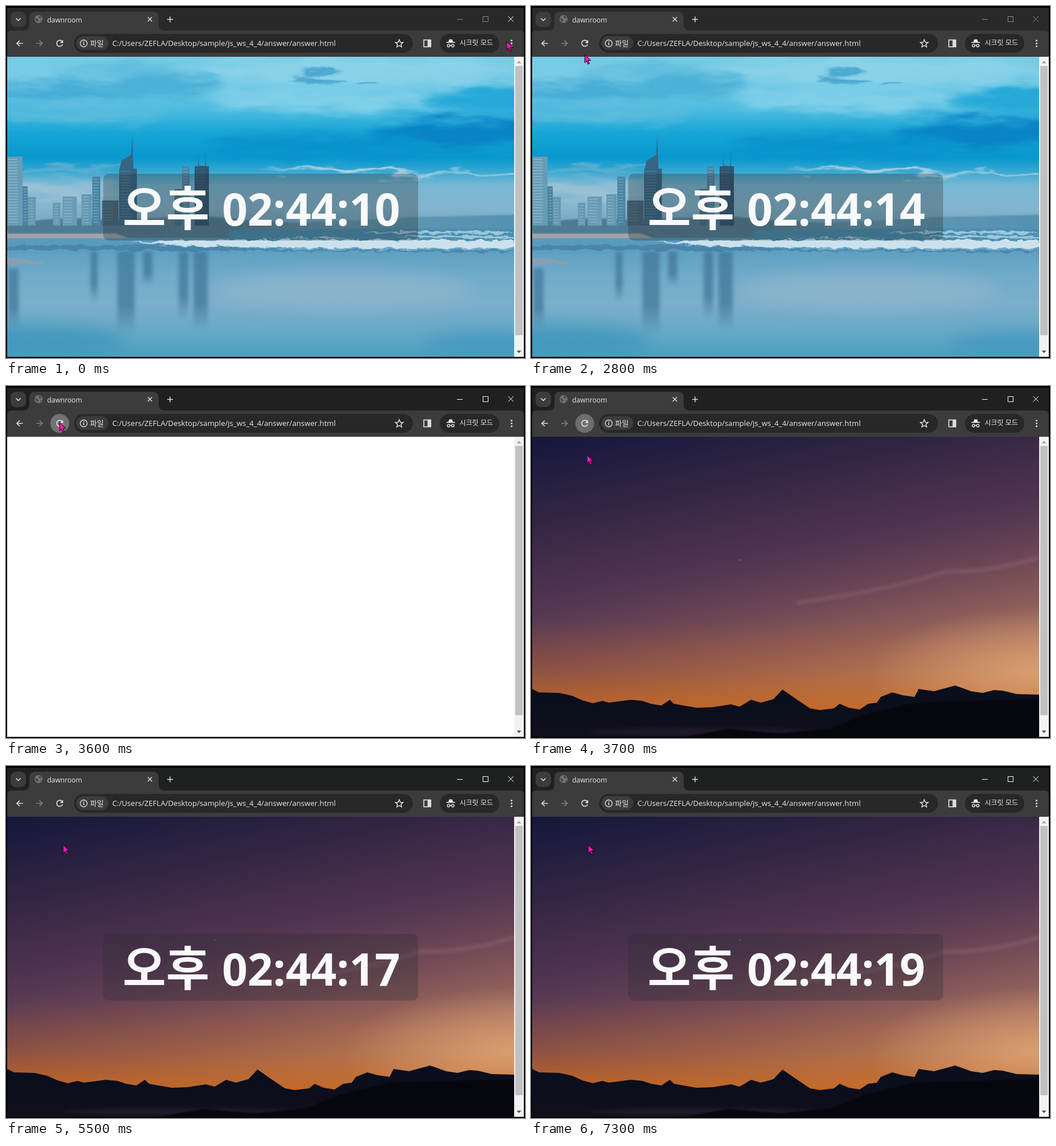
Recreate the animation shown at these times as an HTML page. Size 908x617 px, loop 8 s.

```html
<!DOCTYPE html>
<html lang="ko">
<head>
<meta charset="utf-8">
<title>dawnroom</title>
<style>
  html, body { margin: 0; width: 100%; height: 100%; overflow: hidden; background: #000; }
  svg { display: block; width: 908px; height: 617px; }
  text { fill: #e8e8e8; font-family: "Open Sans", "Noto Sans", sans-serif; white-space: pre; }
  .ko { font-family: "Noto Sans CJK KR", "Noto Sans CJK", sans-serif; }
  .line { fill: none; stroke: #dcdcdc; stroke-width: 1.7; }
  .soft { filter: blur(14px); }
  .haze { filter: blur(3px); }
  .fine { filter: blur(1px); }
  .cloud { filter: blur(9px) url(#billow); }
  .wisp { filter: blur(2px) url(#billow); }
  .foam { filter: url(#ripple) blur(.6px); }
  #clock text { font-weight: 700; fill: #f8f9fa; }
</style>
</head>
<body>
<svg viewBox="0 0 908 617">
  <defs>
    <clipPath id="page"><rect x="2" y="89" width="887" height="526"/></clipPath>
    <filter id="billow" color-interpolation-filters="sRGB">
      <feTurbulence type="fractalNoise" baseFrequency=".012 .05" numOctaves="4" seed="4" result="noise"/>
      <feDisplacementMap in="SourceGraphic" in2="noise" scale="42" xChannelSelector="R" yChannelSelector="G"/>
    </filter>
    <filter id="ripple" color-interpolation-filters="sRGB">
      <feTurbulence type="fractalNoise" baseFrequency=".05 .12" numOctaves="3" seed="8" result="noise"/>
      <feDisplacementMap in="SourceGraphic" in2="noise" scale="11" xChannelSelector="R" yChannelSelector="G"/>
    </filter>
    <linearGradient id="sky" x2="0" y2="1">
      <stop offset="0" stop-color="#78cbe4"/><stop offset=".14" stop-color="#7bcde7"/>
      <stop offset=".31" stop-color="#4bbbe0"/><stop offset=".43" stop-color="#18a6d6"/>
      <stop offset=".58" stop-color="#0798ce"/><stop offset=".66" stop-color="#38a8d2"/>
      <stop offset=".74" stop-color="#78b8d4"/><stop offset=".87" stop-color="#83b5ce"/>
      <stop offset="1" stop-color="#6aa4c0"/>
    </linearGradient>
    <linearGradient id="wet" x2="0" y2="1">
      <stop offset="0" stop-color="#5d9fc1"/><stop offset=".25" stop-color="#70abca"/>
      <stop offset=".5" stop-color="#7bafcb"/><stop offset=".76" stop-color="#68a9c7"/>
      <stop offset="1" stop-color="#4c9fc2"/>
    </linearGradient>
    <linearGradient id="hills">
      <stop offset="0" stop-color="#4e7b92"/><stop offset=".45" stop-color="#527f96"/>
      <stop offset=".65" stop-color="#6398b3"/><stop offset="1" stop-color="#5592b2"/>
    </linearGradient>
    <linearGradient id="fade" x2="0" y2="1">
      <stop offset="0" stop-color="#34698b" stop-opacity=".55"/>
      <stop offset=".65" stop-color="#34698b" stop-opacity=".6"/>
      <stop offset="1" stop-color="#34698b" stop-opacity="0"/>
    </linearGradient>
    <linearGradient id="dusk" gradientUnits="userSpaceOnUse" x1="0" y1="89" x2="117" y2="673">
      <stop offset="0" stop-color="#14173a"/><stop offset=".29" stop-color="#382846"/>
      <stop offset=".5" stop-color="#533652"/><stop offset=".64" stop-color="#6e4755"/>
      <stop offset=".78" stop-color="#8f5f5a"/><stop offset="1" stop-color="#cb9873"/>
    </linearGradient>
    <linearGradient id="glow" x2="0" y2="1">
      <stop offset="0" stop-color="#b85a1e" stop-opacity="0"/>
      <stop offset=".55" stop-color="#b85a1e" stop-opacity=".32"/>
      <stop offset="1" stop-color="#c4631c" stop-opacity=".88"/>
    </linearGradient>
    <radialGradient id="halo">
      <stop offset="0" stop-color="#e3aa7c" stop-opacity=".7"/>
      <stop offset="1" stop-color="#e3aa7c" stop-opacity="0"/>
    </radialGradient>
    <linearGradient id="ridge" x2="0" y2="1">
      <stop offset="0" stop-color="#0a0e1c"/><stop offset=".6" stop-color="#0c0e1b"/>
      <stop offset="1" stop-color="#11101f"/>
    </linearGradient>
  </defs>

  <rect width="908" height="617"/>
  <rect id="bar" x="2" y="3" width="904" height="60"/>
  <path d="M2 89V51q0-8 8-8h20q11 0 11-11V20q0-10 10-10h206q10 0 10 10v12q0 11 11 11h620q8 0 8 8v38z" fill="#3c3c3c"/>
  <rect x="8" y="10" width="27" height="27" rx="9" fill="#3c3c3c"/>
  <path class="line" d="M17.5 21.5l4 4 4-4"/>
  <circle cx="57" cy="23" r="7" fill="#72767a"/>
  <path d="M51 21l4 1 2 3-2 3-3-3zM57 17l5 2-1 3-4-1zM60 24l3 1-2 3z" fill="#474a4d"/>
  <text x="72" y="29" font-size="12">dawnroom</text>
  <path class="line" d="M248 19.5l7.500 7.500m0-7.500l-7.500 7.500M282 23.500h10m-5-5v10" style="stroke-width:1.500"/>
  <g id="controls" fill="none">
    <path d="M789 23.500h10"/><rect x="834.500" y="18.500" width="9" height="9"/>
    <path id="close" d="M878.500 18l9.500 9.500m0-9.500l-9.500 9.500"/>
  </g>

  <circle id="hover" cx="94" cy="65.500" r="16.500"/>
  <path class="line" d="M29.500 65.500H19m5-5l-5 5 5 5"/>
  <path class="line" d="M53 65.500h10.500m-5-5l5 5-5 5" style="stroke:#808080"/>
  <path class="line" d="M98.500 62.500A5.300 5.300 0 1 0 99 67.200"/>
  <path d="M100 59.500v5.500h-5.500z" fill="#dcdcdc"/>
  <rect x="119" y="49" width="593" height="33" rx="16.500" fill="#282828"/>
  <rect x="123" y="53" width="56" height="24" rx="12" fill="#3c3c3c"/>
  <circle class="line" cx="136" cy="65.500" r="6" style="stroke-width:1.400"/>
  <path class="line" d="M136 64.500v4m0-6.500v1.500"/>
  <text class="ko" x="147" y="69.500" font-size="13">파일</text>
  <text x="186" y="70" font-size="13.100">C:/Users/ZEFLA/Desktop/sample/js_ws_4_4/answer/answer.html</text>
  <path class="line" d="M688 59l1.900 4.500 4.800.4-3.700 3.200 1.200 4.700-4.200-2.500-4.200 2.500 1.200-4.700-3.700-3.200 4.800-.4z" style="stroke-width:1.500"/>
  <rect class="line" x="731" y="59.500" width="12" height="12"/>
  <rect x="737.500" y="59.500" width="6" height="12" fill="#dcdcdc"/>
  <rect x="759" y="49" width="104" height="33" rx="16.500" fill="#282828"/>
  <path d="M774 63l1.500-4.500h5L782 63h3.500v1.500h-15V63z" fill="#f0f0f0"/>
  <path class="line" d="M776.500 69.500a2.200 2.200 0 1 1-4.400 0 2.200 2.200 0 1 1 4.400 0q1.500-1 3 0a2.200 2.200 0 1 1 4.400 0 2.200 2.200 0 1 1-4.400 0" style="stroke-width:1.500"/>
  <text class="ko" x="793.500" y="69" font-size="12">시크릿 모드</text>
  <g fill="#dcdcdc"><circle cx="884.500" cy="60.500" r="1.600"/><circle cx="884.500" cy="65.500" r="1.600"/><circle cx="884.500" cy="70.500" r="1.600"/></g>

  <rect x="2" y="89" width="887" height="526" fill="#fff"/>
  <rect x="889" y="89" width="17" height="526" fill="#f1f3f3"/>
  <rect x="891" y="105" width="13" height="472" fill="#c1c1c1"/>
  <path d="M893.500 100.500h8l-4-4.500z" fill="#a3a3a3"/><path d="M893.500 604h8l-4 4.500z" fill="#505050"/>

  <g id="day" clip-path="url(#page)">
    <rect x="2" y="89" width="887" height="305" fill="url(#sky)"/>
    <g class="cloud">
      <ellipse cx="610" cy="110" rx="270" ry="20" fill="#8ad2e8"/>
      <ellipse cx="560" cy="165" rx="200" ry="20" fill="#80cfe8"/>
      <ellipse cx="90" cy="150" rx="150" ry="16" fill="#45abd4"/>
      <ellipse cx="280" cy="140" rx="110" ry="20" fill="#4bb0d7"/>
      <ellipse cx="200" cy="112" rx="120" ry="8" fill="#5cb9db"/>
      <ellipse cx="130" cy="190" rx="150" ry="12" fill="#5fbcdd"/>
      <ellipse cx="870" cy="165" rx="130" ry="22" fill="#25a8d8"/>
      <ellipse cx="830" cy="222" rx="190" ry="24" fill="#0883c5"/>
      <ellipse cx="560" cy="245" rx="210" ry="18" fill="#0892cc"/>
      <ellipse cx="80" cy="325" rx="120" ry="16" fill="#9cc1d4"/>
    </g>
    <g class="wisp">
      <ellipse cx="548" cy="126" rx="46" ry="6" fill="#4da8d0"/>
      <ellipse cx="627" cy="132" rx="20" ry="4" fill="#4da8d0"/>
      <path d="M440 294q100-14 210-8 110 10 239 4v5q-150 2-240-2-110-6-209 1z" fill="#c3dae5"/>
      <path d="M2 289q90-20 200-8v9Q90 280 2 299z" fill="#57add0"/>
    </g>
    <path d="M2 384q90-18 170-9l60-2 120-4 70 6 80 5 110-4 100-6 177-4v42H2z" fill="url(#hills)" class="fine"/>
    <g id="city"></g>
    <path d="M199 285l3-14 17-10 2-36 1 36 1 24zM332 282l4-2 .5-20 1 20 11 0 .5-24 1 25z" fill="#356583"/>
    <path d="M2 399h190l30 11H2z" fill="#a3a5a6" class="fine"/>
    <path d="M2 407h887v24H2z" fill="#589bbd"/>
    <path d="M390 393q250-4 499-2v22H390z" fill="#468fb2" class="fine"/>
    <rect x="2" y="426" width="887" height="189" fill="url(#wet)"/>
    <g class="foam">
      <path d="M218 413q200-5 671-3v16q-260 0-400-3-180-1-271-10z" fill="#cbe2ed"/>
      <path d="M620 399q90-9 269-2l-30 4q-100-4-239-2zM680 405q100-6 209 0v3zM440 406h180l-60 2z" fill="#9fc6da"/>
      <path d="M300 419q200 8 589 5v3q-400 2-589-8z" fill="#76abc7"/>
      <path d="M2 421q250-6 480 6l407 2v3L2 427z" fill="#4b86a8"/>
      <path d="M2 443q50 2 68 7-25 4-68 4z" fill="#8a9fb0"/>
    </g>
    <g class="soft">
      <ellipse cx="590" cy="500" rx="230" ry="32" fill="#89b3cb"/>
      <ellipse cx="40" cy="590" rx="170" ry="30" fill="#4499bd"/>
      <ellipse cx="850" cy="595" rx="120" ry="22" fill="#4799bf"/>
    </g>
    <g id="mirror" class="haze" fill="url(#fade)"></g>
  </g>

  <g id="night" clip-path="url(#page)">
    <rect x="2" y="89" width="887" height="526" fill="url(#dusk)"/>
    <rect x="2" y="410" width="887" height="160" fill="url(#glow)"/>
    <ellipse cx="880" cy="500" rx="290" ry="110" fill="url(#halo)"/>
    <path class="haze" d="M465 380q170-24 260-55 80 2 164-25" fill="none" stroke="#9a7889" stroke-width="5" opacity=".45"/>
    <circle cx="365" cy="305" r="1" fill="#a48a9b"/>
    <path d="M2 531l12 6 36 1 22 5 18 8 18 5 17-4 11 3 39-5 20 2 15 5 18 3 15-10 7 7 40 7 27-1 33-5 15 4 20-12 17 5 22-6 16-17 20 14 28 19 17 3 25-3 10-8 16 7 19 3 15-10 15-2 7-10 20-8 18 5 21 3 7-14 27 4 37-10 28 10 20 3 20-5 15 1 25 6 39 1v75H2z" fill="url(#ridge)"/>
    <ellipse class="haze" cx="300" cy="606" rx="200" ry="6" fill="#211a2b"/>
    <path d="M270 615l75-14 90 8 90-9 60-24 87-21 217-6v66z" fill="#06070d" class="fine"/>
  </g>

  <g id="clock">
    <rect x="170" y="294" width="551" height="117" rx="10" fill="#2a2c2f" fill-opacity=".3"/>
    <text class="ko" x="204" y="384.500" font-size="82.500">오후</text>
    <text id="time" x="378" y="385" font-size="78"></text>
  </g>
  <path id="cursor" d="M0 0v14.500l3.300-3 2.400 5.500 2.500-1.100-2.400-5.300 4.700-.4z" fill="#f516b4" stroke="#180512"/>
</svg>
<script>
  const $ = id => document.getElementById(id);
  const LOOP = 8000, STEP = 100;

  function addRect(parent, x, y, width, height, fill) {
    const rect = document.createElementNS("http://www.w3.org/2000/svg", "rect");
    Object.entries({ x, y, width, height, ...(fill && { fill }) })
      .forEach(([name, value]) => rect.setAttribute(name, value));
    $(parent).append(rect);
  }

  // left, top, width, colour, window colour
  const towers = [
    [2, 264, 27, "#669cb6", "#92b8c9"], [29, 316, 9, "#4d82a0", "#73a2b9"],
    [38, 335, 14, "#6598b1", "#83adc1"], [82, 345, 13, "#6799b2", "#82adc1"],
    [99, 334, 25, "#699db6", "#86b2c6"], [132, 330, 18, "#6598b1", "#89b1c4"],
    [151, 299, 14, "#4a84a3", "#6ea1b9"], [168, 341, 29, "#46697e", "#537c92"],
    [198, 285, 31, "#356583", "#4c7f9c"], [295, 321, 13, "#486f87", "#527d95"],
    [308, 281, 13, "#4c85a4", "#6d9eb8"], [330, 281, 25, "#2f556f", "#3b6580"]
  ];
  towers.forEach(([x, y, w, colour, light]) => {
    addRect("city", x, y, w, 385 - y, colour);
    for (let row = y + 4; row < 380; row += 5) addRect("city", x + 2, row, w * .6, 1.5, light);
  });
  [[4, 460, 18, 105], [148, 430, 12, 90], [195, 430, 30, 145], [240, 430, 16, 60],
   [302, 430, 17, 120], [328, 430, 25, 140]].forEach(box => addRect("mirror", ...box));

  // time, x, y of the pointer tip
  const path = [
    [0, 876, 62], [200, 800, 68], [500, 380, 98], [900, 91, 105], [1100, 91, 105],
    [1200, 93, 98], [2700, 93, 98], [2800, 94, 85], [2900, 94, 70], [3000, 94, 64],
    [3600, 94, 64], [3700, 98, 121], [3900, 100, 135], [4100, 100, 138], [LOOP, 100, 138]
  ];
  const ticks = [[0, 10], [100, 11], [1000, 12], [1900, 13], [2800, 14],
                 [4500, 16], [5500, 17], [6400, 18], [7300, 19]];

  function pointerAt(t) {
    const i = path.findIndex(key => key[0] > t);
    const [t0, x0, y0] = path[i - 1], [t1, x1, y1] = path[i];
    const k = (t - t0) / (t1 - t0);
    return [x0 + (x1 - x0) * k, y0 + (y1 - y0) * k].map(Math.round);
  }

  const show = (id, on) => $(id).style.display = on ? "" : "none";

  function hoverOpacity(t) {
    if (t < 3500 || t >= 4100) return 0;
    if (t < 3600) return .14;
    return t < 3700 ? .28 : .25 * (4100 - t) / 400;
  }

  function draw() {
    const t = Math.floor(performance.now() % LOOP / STEP) * STEP;
    const active = t >= 3500;
    show("day", t < 3600);
    show("night", t >= 3700);
    show("clock", t < 3600 || t >= 4500);
    $("time").textContent = "02:44:" + ticks.findLast(tick => tick[0] <= t)[1];
    $("bar").setAttribute("fill", active ? "#1f2120" : "#292929");
    $("controls").setAttribute("stroke", active ? "#fff" : "#8b8b8b");
    $("close").setAttribute("stroke", active || t < 100 ? "#fff" : "#8b8b8b");
    $("hover").setAttribute("fill", `rgba(255,255,255,${hoverOpacity(t)})`);
    $("cursor").setAttribute("transform", `translate(${pointerAt(t)})`);
    requestAnimationFrame(draw);
  }
  draw();
</script>
</body>
</html>
```
